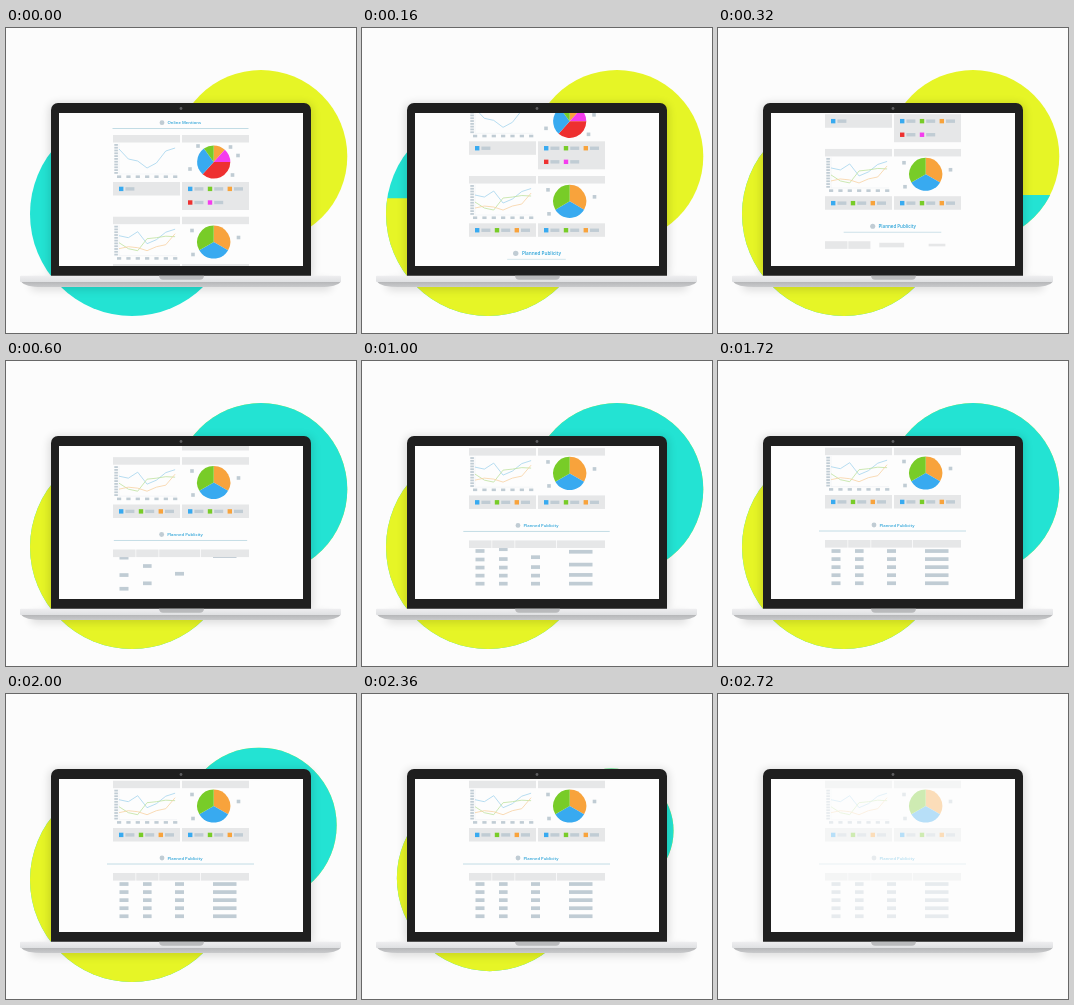
Recreate the animation shown at these times as an HTML page. Size 350 px wide and 305 px high, loop 2760 ms.

```html
<!DOCTYPE html>
<html lang="en">
<head>
<meta charset="utf-8">
<title>Laptop report</title>
<style>
html, body { margin: 0; width: 100%; height: 100%; overflow: hidden; background: #fcfcfc; }
svg { display: block; width: 100vw; height: 100vh; }
text { font: 600 4.2px "Open Sans", sans-serif; fill: #2ba3d8; }
</style>
</head>
<body>
<svg id="stage" viewBox="0 0 350 305">
  <defs>
    <clipPath id="screen"><rect x="53" y="85" width="244" height="153"/></clipPath>
    <clipPath id="rows"><rect x="100" y="182" width="150" height="60"/></clipPath>
    <clipPath id="wipeL"><rect x="0" y="305" width="350" height="305"/></clipPath>
    <clipPath id="wipeR"><rect x="0" y="305" width="350" height="305"/></clipPath>
    <filter id="soft" x="-20%" y="-20%" width="140%" height="140%"><feGaussianBlur stdDeviation="4"/></filter>
    <linearGradient id="deck" x2="0" y2="1">
      <stop offset="0" stop-color="#eeeef0"/><stop offset="1" stop-color="#dfe0e2"/>
    </linearGradient>
    <linearGradient id="lip" x2="0" y2="1">
      <stop offset="0" stop-color="#b4b5b7"/><stop offset="1" stop-color="#c9cacc"/>
    </linearGradient>
  </defs>
  <rect width="350" height="305" fill="#fcfcfc"/>
  <g id="discs"></g>
  <g filter="url(#soft)" opacity=".13">
    <rect x="43" y="75" width="264" height="175" rx="8"/>
    <rect x="24" y="252" width="302" height="10" rx="5"/>
  </g>
  <path d="M45 248V82a7 7 0 0 1 7-7H298a7 7 0 0 1 7 7V248z" fill="#1f1f1f"/>
  <circle cx="175" cy="80.5" r="1.4" fill="#5d5d5f"/>
  <rect x="53" y="85" width="244" height="153" fill="#fdfdfd"/>
  <g clip-path="url(#screen)"><g id="page"></g></g>
  <path d="M15 253.5H335Q331 259 314 259H36Q19 259 15 253.5z" fill="url(#lip)"/>
  <rect x="14" y="247.8" width="321" height="6.2" rx="1" fill="url(#deck)"/>
  <path d="M153 247.8H198Q197.500 251.800 194 251.800H157Q153.500 251.800 153 247.800z" fill="#b9babc"/>
</svg>
<script>
const LOOP = 2760, YELLOW = '#e6f526', CYAN = '#23e3d3';
const BLUE = '#38aaf0', GREEN = '#78cc28', ORANGE = '#f8a33c', RED = '#ee3030', PINK = '#f43cee';
const BAR = '#e6e7e8', GREY = '#c0ccd4';
const $ = id => document.getElementById(id);
const clamp = x => Math.min(1, Math.max(0, x));
const out = (x, n) => 1 - (1 - clamp(x)) ** n;

function add(parent, tag, attrs) {
  const el = document.createElementNS('http://www.w3.org/2000/svg', tag);
  set(el, attrs);
  parent.appendChild(el);
  return el;
}
function set(el, attrs) {
  for (const k in attrs) el.setAttribute(k, attrs[k]);
}
const page = $('page');
const box = (x, y, width, height, fill, parent = page) => add(parent, 'rect', {x, y, width, height, fill});

function title(label, y) {
  const g = add(page, 'g', {});
  add(g, 'circle', {cx: 156, cy: y, r: 2.4, fill: GREY});
  add(g, 'text', {x: 161.5, y: y + 1.5}).textContent = label;
  return g;
}
function rule(y, half) {
  return add(page, 'path', {d: `M${174.5 - half} ${y}H${174.5 + half}`, stroke: '#bcd9e2', 'stroke-width': .9});
}
function legend(x, y, height, colors) {
  box(x, y, 67, height, BAR);
  colors.forEach((c, i) => {
    const lx = x + 6 + i % 3 * 19.8, ly = y + 4.7 + Math.floor(i / 3) * 13.6;
    box(lx, ly, 4.4, 4.4, c);
    box(lx + 6.4, ly + .5, 9, 3.4, GREY);
  });
}
function chart(y, lines) {
  box(107, y, 67, 7.5, BAR);
  box(176, y, 67, 7.5, BAR);
  for (let i = 0; i < 11; i++) box(108.3, y + 9 + i * 2.8, 3.6, 1.8, GREY);
  for (let i = 0; i < 7; i++) box(111 + i * 9.35, y + 40.4, 4.2, 2.6, GREY);
  add(page, 'path', {d: `M113 ${y + 8.500}V${y + 39}H171`, fill: 'none', stroke: '#e8edf0', 'stroke-width': .5});
  for (const [color, ...ys] of lines) {
    add(page, 'polyline', {
      points: ys.map((v, i) => `${113 + i * 9.35},${y + v}`).join(' '),
      fill: 'none', stroke: color, 'stroke-width': .8
    });
  }
}
function pie(cy, slices, tags) {
  const cx = 207.7, r = 16.6;
  const at = a => `${cx + r * Math.sin(a * Math.PI / 180)} ${cy - r * Math.cos(a * Math.PI / 180)}`;
  let from = 0;
  for (const [color, to] of slices) {
    add(page, 'path', {d: `M${cx} ${cy}L${at(from)}A${r} ${r} 0 ${to - from > 180 ? 1 : 0} 1 ${at(to)}z`, fill: color});
    from = to;
  }
  for (const [x, y] of tags) box(x - 1.8, cy + y - 1.8, 3.6, 3.6, GREY);
}

// Page content, laid out at its resting scroll position
title('Online Mentions', -7.3);
rule(-1.5, 68);
chart(5, [['#a5d5ee', 14, 24, 26, 33, 28, 16, 13]]);
pie(32, [[ORANGE, 42], [PINK, 90], [RED, 222], [BLUE, 324], [GREEN, 360]],
  [[192, -16], [224.5, -15], [232, -6.5], [226.5, 13], [184, 7]]);
legend(107, 52, 13.5, [BLUE]);
legend(176, 52, 28, [BLUE, GREEN, ORANGE, RED, PINK]);
chart(86.7, [
  ['#a5d5ee', 19, 21, 15, 27, 23, 15.5, 12.5],
  ['#bfe2a0', 26, 32, 34, 22, 21, 19.5, 20],
  ['#f8d2a4', 32, 30, 31, 34, 30, 28, 17]
]);
pie(112, [[ORANGE, 120], [BLUE, 240], [GREEN, 360]], [[186, -11.5], [232.5, -4.500], [187, 12.500]]);
legend(107, 134, 13.5, [BLUE, GREEN, ORANGE]);
legend(176, 134, 13.5, [BLUE, GREEN, ORANGE]);
const heading = title('Planned Publicity', 164);
const line = rule(170, 73.5);

// Table: cells drop out from behind the header, lowest row first
const cols = [
  {x: 107, w: 22.5, cx: 113.5, cw: 9, head: 0, start: 334},
  {x: 130.2, w: 22.3, cx: 137, cw: 8.6, head: 80, start: 405},
  {x: 153.2, w: 41, cx: 169, cw: 9, head: 240, start: 480},
  {x: 195, w: 48, cx: 207, cw: 23.5, head: 280, start: 568}
];
const body = add(page, 'g', {'clip-path': 'url(#rows)'});
const cells = [];
for (const c of cols) {
  for (let r = 0; r < 5; r++) {
    const el = box(c.cx, 0, c.cw, 3.7, GREY, body);
    cells.push({el, y: 188.2 + r * 8.05, start: c.start + (4 - r) * 73});
  }
}
for (const c of cols) c.el = box(c.x, 179, c.w, 7.6, BAR);

// Each disc has a base colour and a second one wiped in from below
const disc = (color, next, clip) => [
  add($('discs'), 'circle', {fill: color}),
  add($('discs'), 'circle', {fill: next, 'clip-path': `url(#${clip})`})
];
const right = disc(YELLOW, CYAN, 'wipeR');
const left = disc(CYAN, YELLOW, 'wipeL');
const edges = {L: $('wipeL').firstElementChild, R: $('wipeR').firstElementChild};

function place(pair, cx, cy, r) {
  for (const el of pair) set(el, {cx, cy, r: Math.max(0, r)});
}
function draw(t) {
  const p = out(t / 1340, 4);
  set(page, {
    transform: `translate(0 ${102 * (1 - p)})`,
    opacity: 1 - .75 * clamp((t - 2460) / 300)
  });
  const k = 1 + .2 * (1 - p);
  set(heading, {transform: `translate(175 164) scale(${k}) translate(-175 -164)`});
  set(line, {transform: `translate(${174.5 * (1 - p)} 0) scale(${p} 1)`});

  for (const c of cols) {
    const s = out((t - c.head) / 300, 3), mx = c.x + c.w / 2;
    set(c.el, {transform: `translate(${mx} 182.8) scale(${s}) translate(${-mx} -182.8)`});
  }
  for (const c of cells) {
    set(c.el, {y: c.y - 45 * (1 - out((t - c.start) / 480, 3)), opacity: t < c.start ? 0 : 1});
  }

  set(edges.L, {y: 288 - 206 * clamp(t / 280)});
  set(edges.R, {y: 215 - 175 * clamp((t - 232) / 320)});
  const qr = clamp((t - 1800) / 2000);
  const ql = .6 * clamp((t - 2220) / 500) ** 1.5;
  place(right, 255 - 20 * qr, 128.3 + 30 * qr, 86.3 * (1 - qr));
  place(left, 126 + 20 * ql, 186 - 20 * ql, 102 * (1 - ql));
}

let began;
function tick(now) {
  if (began === undefined) began = now;
  draw((now - began) % LOOP);
  requestAnimationFrame(tick);
}
draw(0);
requestAnimationFrame(tick);
</script>
</body>
</html>
```
